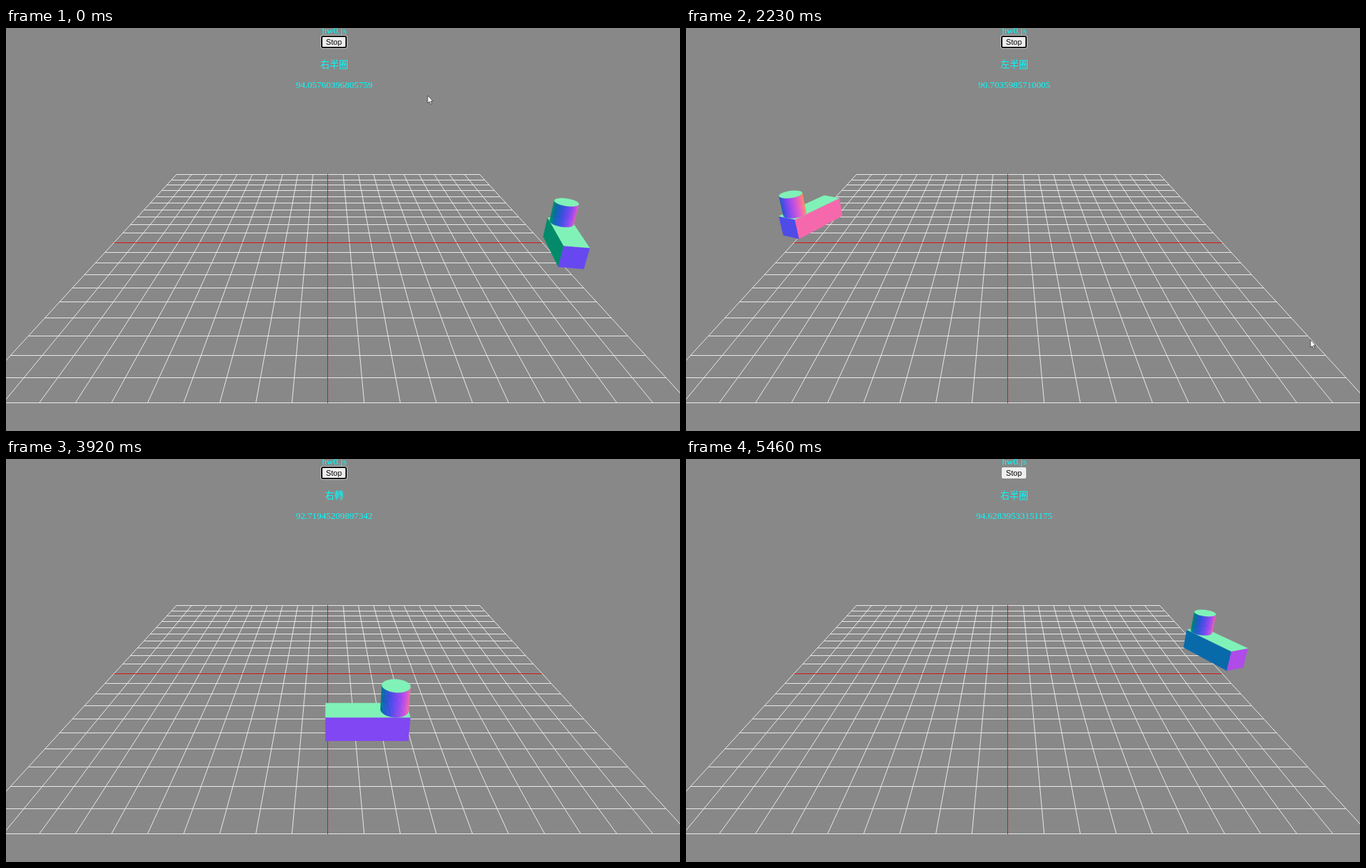
Animation, 967 px wide and 579 px high, one loop 5.54 s. Source, as an HTML page with a canvas:

```html
<!DOCTYPE html>
<html lang="zh-Hant">
<head>
<meta charset="utf-8">
<style>
  html, body { margin: 0; width: 967px; height: 579px; overflow: hidden; background: #888; }
  canvas { position: absolute; left: 0; top: 0; }
  div {
    position: absolute; left: 0; width: 942px; text-align: center; white-space: nowrap;
    font: 13.33px/16px "Liberation Serif", "Noto Sans CJK TC", "Noto Sans CJK", serif; color: cyan;
  }
  #stop {
    left: 453px; top: 12px; width: 35px; height: 16px; border-radius: 2px;
    background: #efefef; color: #000; font: 11.1px/16px "Liberation Sans", sans-serif;
  }
  #stop.focus { outline: 2px solid #101010; outline-offset: -1px; box-shadow: 0 0 0 2px #fff8; }
</style>
</head>
<body>
<canvas id="stage" width="967" height="579"></canvas>
<div style="top:-4px">hw0.js</div>
<div id="stop">Stop</div>
<div id="label" style="top:45px"></div>
<div id="value" style="top:74px"></div>
<script>
const $ = id => document.getElementById(id);
const ctx = $('stage').getContext('2d');
const LOOP = 5540, FPS = 13;

// Camera pitch, distance and focal length; one unit is one grid cell.
const SIN = 0.4455, COS = 0.8953, DIST = 21.95, FOCAL = 673.7;
const project = ([x, y, z]) => {
  const scale = FOCAL / (DIST - SIN * y - COS * z);
  return [462.1 + x * scale, 308.05 - (COS * y - SIN * z) * scale];
};

// Surface colour is the view-space normal mapped to RGB.
const normalColor = ([x, y, z]) =>
  `rgb(${[x, COS * y - SIN * z, SIN * y + COS * z].map(n => Math.round(127.5 * (n + 1)))})`;

function polygon(points, fill, stroke = fill, width = 0.4) {
  ctx.beginPath();
  points.forEach(p => ctx.lineTo(...p));
  ctx.closePath();
  ctx.fillStyle = fill;
  ctx.strokeStyle = stroke;
  ctx.lineWidth = width;
  ctx.fill();
  ctx.stroke();
}

// Draws a face only when its projected winding is towards the camera.
function face(corners, normal) {
  const pts = corners.map(project);
  const area = pts.reduce((sum, [x, y], i) => {
    const [nx, ny] = pts[(i + 1) % pts.length];
    return sum + x * ny - nx * y;
  }, 0);
  if (area < 0) polygon(pts, normalColor(normal));
}

// Upright prism over a ground outline, with a normal for each side.
function prism(outline, normals, bottom, top) {
  const at = ([x, z], y) => [x, y, z];
  outline.forEach((p, i) => {
    const q = outline[(i + 1) % outline.length];
    face([at(p, bottom), at(q, bottom), at(q, top), at(p, top)], at(normals[i], 0));
  });
  face(outline.map(p => at(p, top)), [0, 1, 0]);
}

function drawGrid() {
  ctx.lineWidth = 1;
  const line = (a, b, color) => {
    ctx.strokeStyle = color;
    ctx.beginPath();
    ctx.moveTo(...a);
    ctx.lineTo(...b);
    ctx.stroke();
  };
  const row = (x, z) => {
    const [px, py] = project([x, 0, z]);
    return [px, Math.floor(py) + 0.5];
  };
  const cell = i => {
    const color = i ? '#eaeaea' : '#d81414';
    line(row(-10, i), row(10, i), color);
    if (i) line(project([i, 0, -10]), project([i, 0, 10]), color);
    else line([461.5, 210], [461.5, 539], color);
  };
  for (let i = 1; i <= 10; i++) { cell(i); cell(-i); }
  cell(0);
}

function drawCar(x, z, [hx, hz]) {
  const turn = (u, v) => [hx * u - hz * v, hz * u + hx * v];
  const place = (u, v) => {
    const [dx, dz] = turn(u, v);
    return [x + dx, z + dz];
  };
  prism(
    [place(-1.5, 0.5), place(1.5, 0.5), place(1.5, -0.5), place(-1.5, -0.5)],
    [turn(0, 1), turn(1, 0), turn(0, -1), turn(-1, 0)], 0, 1);

  const sides = 48, outline = [], normals = [];
  for (let i = 0; i < sides; i++) {
    const a = -2 * Math.PI * i / sides, mid = a - Math.PI / sides;
    outline.push(place(1 + 0.5 * Math.cos(a), 0.5 * Math.sin(a)));
    normals.push(turn(Math.cos(mid), Math.sin(mid)));
  }
  prism(outline, normals, 1, 2);
}

function drawCursor(x, y) {
  const shape = [[0, 0], [0, 11], [2.5, 8.8], [4.3, 12.6], [6, 11.8], [4.3, 8.2], [7.5, 8]];
  polygon(shape.map(([dx, dy]) => [x + dx, y + dy]), '#fff', '#333', 0.8);
}

// Angle over steps: it wraps after the far side and rests on the near straight.
const WRAP = 19, START = 48.6, END = 52.66;
const NEAR = 92.71945209897342;
const ANGLES = [
  [0, 94.05760396805759], [18, 95.90029821510115],
  [WRAP, 89.67511086951403], [29, 90.7035985710005], [39, 91.73208627248697],
  [START, NEAR], [END, NEAR],
  [59, 93.37937594899057], [71, 94.62839533151175], [72, 94.73248011]
];
function angleAt(step) {
  const i = ANGLES.findIndex(([s]) => s > step);
  const [s0, a0] = ANGLES[i - 1], [s1, a1] = ANGLES[i];
  return a0 + (a1 - a0) * (step - s0) / (s1 - s0);
}

const LEFT = -5.19, RIGHT = 5.61, RADIUS = 5;

function render(step) {
  const angle = angleAt(step);
  const straight = step > START && step < END;
  const onLeft = step >= WRAP && step <= START;
  const center = straight
    ? LEFT + (RIGHT - LEFT) * (step - START) / (END - START)
    : onLeft ? LEFT : RIGHT;

  ctx.fillStyle = '#888';
  ctx.fillRect(0, 0, 967, 579);
  drawGrid();
  drawCar(center + RADIUS * Math.cos(angle), -RADIUS * Math.sin(angle),
    straight ? [1, 0] : [-Math.sin(angle), -Math.cos(angle)]);

  if (step < 1) drawCursor(605, 97);
  if (step >= 24 && step < 31) {
    const p = Math.min(1, (step - 24) / 5);
    drawCursor(944 - 48 * p, 365 + 83 * p);
  }

  $('label').textContent = straight ? '右轉' : onLeft ? '左半圈' : '右半圈';
  $('value').textContent = angle;
  $('stop').className = step < 68 ? 'focus' : '';
}

// The picture advances in steps of 1/13 s on a 10 ms clock.
function tick() {
  const ms = Math.floor(performance.now() % LOOP / 10) * 10;
  render(ms < 90 ? 0 : Math.min(71, Math.floor((ms + 5) * FPS / 1000)));
  requestAnimationFrame(tick);
}
tick();
</script>
</body>
</html>
```
